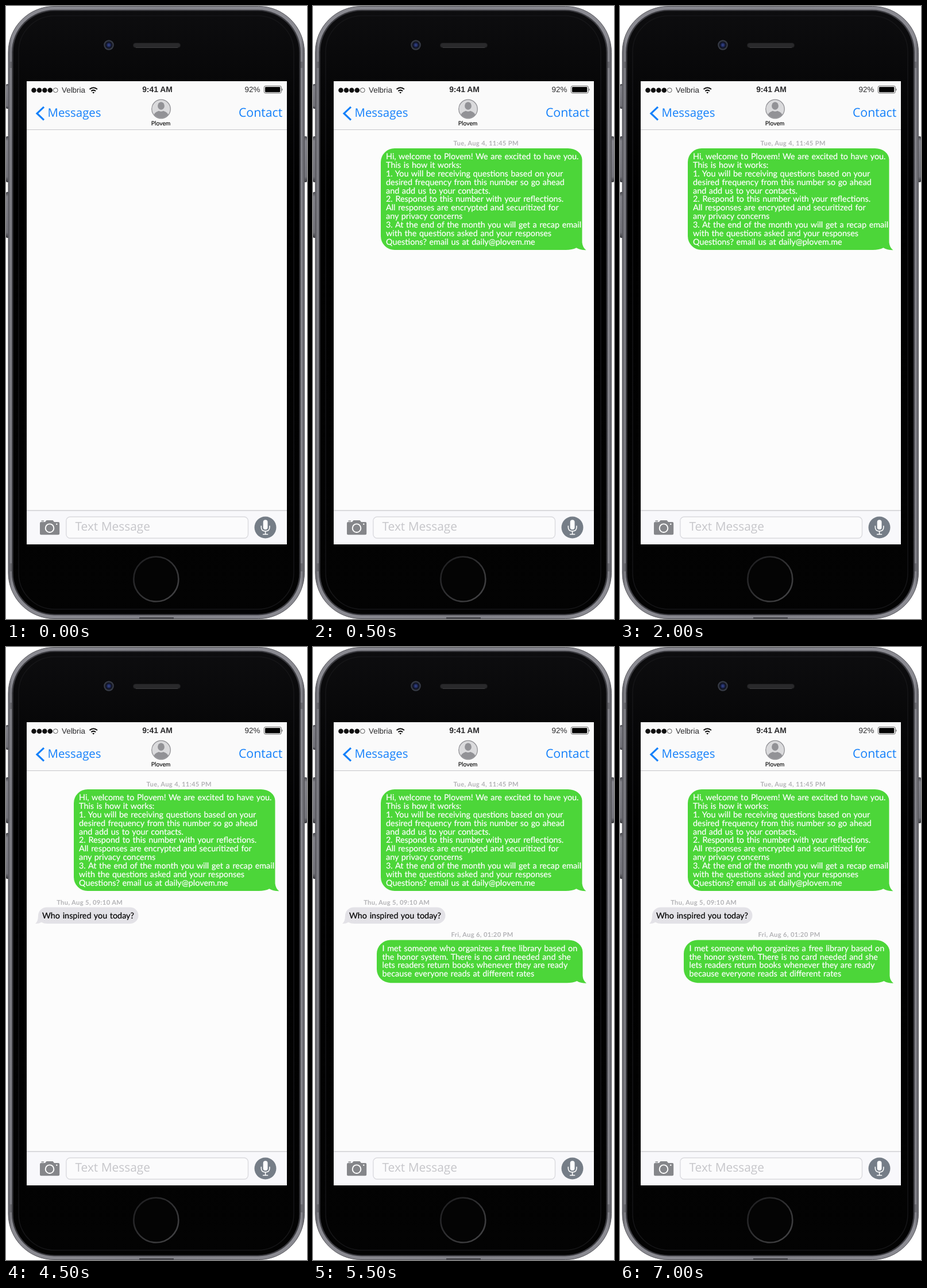
An HTML page that plays this animation: 524 px wide and 1068 px high, repeating every 8 s.

```html
<!DOCTYPE html>
<html lang="en">
<head>
<meta charset="utf-8">
<title>Message thread</title>
<style>
html, body { margin: 0; width: 100%; height: 100%; overflow: hidden; background: #fff; }
svg { display: block; width: 524px; height: 1068px; text-rendering: geometricPrecision; }

.status { font: 13.4px "Liberation Sans", Arial, sans-serif; fill: #2a2a2c; }
.clock { font-size: 13.9px; font-weight: bold; text-anchor: middle; }
.nav { font: 20.4px "Open Sans", sans-serif; fill: #1480fa; }
.contact { font-size: 21.3px; }
.hint { font: 20.9px "Open Sans", sans-serif; fill: #c6c6ca; }
.name { font: 10.4px Lato, sans-serif; stroke: #000; stroke-width: .1; text-anchor: middle; }
.date { font: bold 11.2px Lato, sans-serif; letter-spacing: .35px; fill: #b3b3b6; text-anchor: middle; }
.msg { font: 14.4px Lato, sans-serif; word-spacing: .95px; fill: #000; stroke: #000; stroke-width: .2; }
.out path { fill: #4cd639; }
.out .msg { fill: #fff; stroke: #fff; }

.step { animation: 8s step-end infinite; }
.welcome { animation-name: welcome; }
.question { animation-name: question; }
.answer { animation-name: answer; }
@keyframes welcome { 0% { opacity: 0; } 6.25%, 100% { opacity: 1; } }
@keyframes question { 0% { opacity: 0; } 37.5%, 100% { opacity: 1; } }
@keyframes answer { 0% { opacity: 0; } 68.75%, 100% { opacity: 1; } }
</style>
</head>
<body>
<svg viewBox="0 0 524 1068">
  <defs>
    <linearGradient id="rim" x1="0" x2="1" y1="0" y2="0">
      <stop offset="0" stop-color="#5c5c62"/>
      <stop offset=".012" stop-color="#8b8b92"/>
      <stop offset=".5" stop-color="#808087"/>
      <stop offset=".988" stop-color="#8b8b92"/>
      <stop offset="1" stop-color="#5c5c62"/>
    </linearGradient>
    <linearGradient id="glass" x1="0" x2="0" y1="0" y2="1">
      <stop offset="0" stop-color="#0d0d0f"/>
      <stop offset=".12" stop-color="#070708"/>
      <stop offset=".3" stop-color="#000"/>
      <stop offset="1" stop-color="#030303"/>
    </linearGradient>
    <linearGradient id="ring" x1="0" x2="1" y1="0" y2="1">
      <stop offset="0" stop-color="#1c1c1e"/>
      <stop offset=".5" stop-color="#303032"/>
      <stop offset="1" stop-color="#464648"/>
    </linearGradient>
    <linearGradient id="key" x1="0" x2="0" y1="0" y2="1">
      <stop offset="0" stop-color="#47474c"/>
      <stop offset=".1" stop-color="#85858c"/>
      <stop offset=".88" stop-color="#74747b"/>
      <stop offset="1" stop-color="#38383c"/>
    </linearGradient>
    <radialGradient id="lens">
      <stop offset="0" stop-color="#3a4a92"/>
      <stop offset=".35" stop-color="#1d2757"/>
      <stop offset=".6" stop-color="#0d0f1a"/>
      <stop offset=".78" stop-color="#2c303b"/>
      <stop offset="1" stop-color="#434854"/>
    </radialGradient>
    <clipPath id="face"><circle cx="270" cy="179.5" r="15.6"/></clipPath>
  </defs>

  <!-- phone body -->
  <g fill="url(#key)">
    <rect x="0" y="136" width="6" height="43" rx="2"/>
    <rect x="0" y="227" width="6" height="80" rx="2"/>
    <rect x="0" y="324" width="6" height="80" rx="2"/>
    <rect x="518" y="227" width="6" height="80" rx="2"/>
  </g>
  <rect x="4" y=".5" width="515.5" height="1067" rx="80" fill="url(#rim)" stroke="#55555a"/>
  <g fill="#67676d">
    <path d="M4.500 97h7v11h-7zM512 97h7v11h-7zM4.500 971h7v14h-7zM512 971h7v14h-7z"/>
    <path d="M232 1065h60v2.500h-60z" fill="#45454a"/>
  </g>
  <rect x="10" y="6.500" width="503" height="1055" rx="74" fill="#3c3c41"/>
  <rect x="12.500" y="8.500" width="498" height="1051" rx="72" fill="url(#glass)"/>
  <rect x="22" y="17" width="479" height="1034" rx="63" fill="none" stroke="#161618" stroke-width="1.500"/>

  <circle cx="179" cy="68" r="8.700" fill="url(#lens)"/>
  <rect x="221.500" y="64.500" width="82" height="8" rx="4" fill="#29292b" stroke="#1b1b1d"/>
  <path d="M226 72.500h73" stroke="#3e3e40"/>
  <circle cx="261.300" cy="998.500" r="39" fill="#040404" stroke="url(#ring)" stroke-width="2.600"/>

  <!-- screen -->
  <rect x="36" y="131" width="453" height="807" fill="#fcfcfc"/>
  <rect x="36" y="131" width="453" height="84.500" fill="#fafafa"/>
  <path d="M36 215.500h453" stroke="#c6c6c9"/>
  <rect x="36" y="879" width="453" height="59" fill="#f8f8fb"/>
  <path d="M36 879h453" stroke="#cfcfd3" stroke-width="1.600"/>

  <!-- status bar -->
  <g fill="#111">
    <circle cx="48.500" cy="146.700" r="4.300"/>
    <circle cx="58" cy="146.700" r="4.300"/>
    <circle cx="67.400" cy="146.700" r="4.300"/>
    <circle cx="76.800" cy="146.700" r="4.300"/>
    <circle cx="86.300" cy="146.700" r="3.900" fill="none" stroke="#444" stroke-width=".9"/>
  </g>
  <text class="status" x="97" y="151">Velbria</text>
  <g fill="none" stroke="#111" stroke-width="2">
    <path d="M145.500 145q6.700-5.600 13.400 0M148.300 148.200q3.900-3.200 7.800 0"/>
    <path d="M152.200 152.600l-2-2.200q2-1.500 4 0z" fill="#111" stroke="none"/>
  </g>
  <text class="status clock" x="263.500" y="150.400">9:41 AM</text>
  <text class="status" x="415.500" y="150.400">92%</text>
  <rect x="449.300" y="139.300" width="30" height="12.600" rx="2.600" fill="#fff" stroke="#555" stroke-width=".9"/>
  <rect x="451" y="141" width="26.300" height="9.200" rx="1.200" fill="#050505"/>
  <path d="M480.500 143.300q2 2.300 0 4.600z" fill="#333"/>

  <!-- navigation -->
  <path d="M66 175.800L54 187.200L66 198.600" fill="none" stroke="#1480fa" stroke-width="3.200"/>
  <text class="nav" x="72.500" y="193.300">Messages</text>
  <text class="nav contact" x="404.900" y="193.300">Contact</text>
  <circle cx="270" cy="179.500" r="16.300" fill="#dadadc" stroke="#8b8b8f" stroke-width="1.200"/>
  <g fill="#929296" clip-path="url(#face)">
    <ellipse cx="270" cy="174" rx="5.900" ry="6.800"/>
    <path d="M256.500 197v-5q1.500-7 9.500-9.200q4 2 8 0q8 2.200 9.500 9.200v5z"/>
  </g>
  <text class="name" x="269.600" y="207.700">Plovem</text>

  <!-- compose bar -->
  <g fill="#85868a">
    <path d="M61 899h7l2.500-3h11l2.500 3h7q2.200 0 2.200 2.200v18q0 2-2.200 2H61q-2 0-2-2v-18q0-2.200 2-2.200z"/>
    <path d="M61.500 896.500h4.500v1.600h-4.500z"/>
    <circle cx="76" cy="909.700" r="7.300" fill="none" stroke="#fff" stroke-width="1.900"/>
    <circle cx="88.300" cy="902.700" r="1.200" fill="#fff"/>
  </g>
  <rect x="104.800" y="890" width="316.700" height="37.300" rx="7" fill="#fbfbfc" stroke="#dadade" stroke-width="1.400"/>
  <text class="hint" x="120.500" y="914">Text Message</text>
  <circle cx="451.500" cy="908.500" r="19" fill="#757d87"/>
  <rect x="447.700" y="895.200" width="7.800" height="17" rx="3.900" fill="#fff"/>
  <path d="M444.300 905.500v2.500q0 7 7.300 7t7.300-7v-2.500M451.600 915v5M447 920.500h9.200" fill="none" stroke="#fff" stroke-width="1.600"/>

  <!-- conversation -->
  <g class="out step welcome">
    <text class="date" x="301.200" y="243">Tue, Aug 4, 11:45 PM</text>
    <path d="M142 248H444A24.500 20 0 0 1 468.500 268V412Q469.500 421 475.500 425.200Q465 425.300 458.500 421.200Q451 425 440 425H142A24 24 0 0 1 118 401V272A24 24 0 0 1 142 248z"/>
    <text class="msg" y="267.200">
      <tspan x="127">Hi, welcome to Plovem! We are excited to have you.</tspan>
      <tspan x="127" dy="14.850">This is how it works:</tspan>
      <tspan x="127" dy="14.850">1. You will be receiving questions based on your</tspan>
      <tspan x="127" dy="14.850">desired frequency from this number so go ahead</tspan>
      <tspan x="127" dy="14.850">and add us to your contacts.</tspan>
      <tspan x="127" dy="14.850">2. Respond to this number with your reflections.</tspan>
      <tspan x="127" dy="14.850">All responses are encrypted and securitized for</tspan>
      <tspan x="127" dy="14.850">any privacy concerns</tspan>
      <tspan x="127" dy="14.850">3. At the end of the month you will get a recap email</tspan>
      <tspan x="127" dy="14.850">with the questions asked and your responses</tspan>
      <tspan x="127" dy="14.850">Questions? email us at daily@plovem.me</tspan>
    </text>
  </g>

  <g class="step question">
    <text class="date" x="145.700" y="449">Thu, Aug 5, 09:10 AM</text>
    <path d="M71 453.500H216A14.500 14.250 0 0 1 216 482H72Q66 482 61.500 479.500Q57 482.300 51 482Q56 478 56 468A15 14.500 0 0 1 71 453.500z" fill="#e3e2e7"/>
    <text class="msg" x="63" y="472.600">Who inspired you today?</text>
  </g>

  <g class="out step answer">
    <text class="date" x="294.600" y="505">Fri, Aug 6, 01:20 PM</text>
    <path d="M135 510.500H445A24.500 21 0 0 1 469.500 531.500V573Q470 581 476 585.800Q466 586 459.500 582Q452 585.200 442 585.200H135A24 24 0 0 1 111 561.200V534.500A24 24 0 0 1 135 510.500z"/>
    <text class="msg" y="529.700">
      <tspan x="120.500">I met someone who organizes a free library based on</tspan>
      <tspan x="120.500" dy="14.850">the honor system. There is no card needed and she</tspan>
      <tspan x="120.500" dy="14.850">lets readers return books whenever they are ready</tspan>
      <tspan x="120.500" dy="14.850">because everyone reads at different rates</tspan>
    </text>
  </g>
</svg>
</body>
</html>
```
